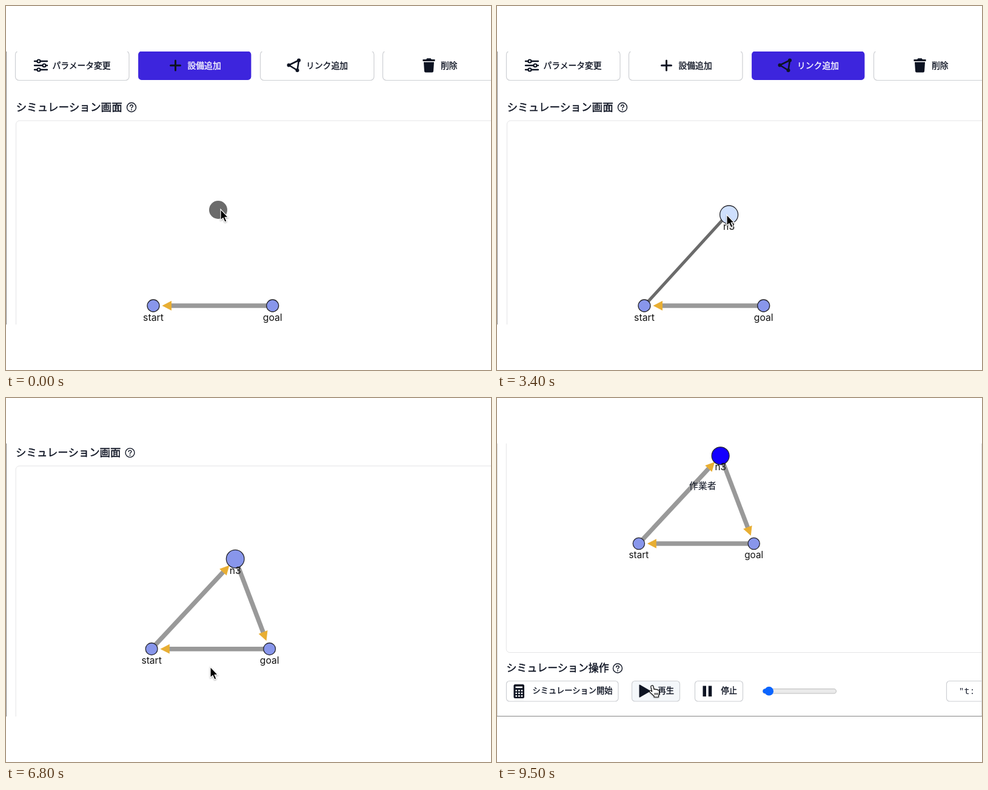
Recreate the animation shown at these times as an HTML page. Size 800 by 600 pixels, loop 9600 ms.

```html
<!DOCTYPE html>
<html lang="ja">
<head>
<meta charset="utf-8">
<style>
html, body { margin: 0; width: 100%; height: 100%; overflow: hidden; background: #fff; }
svg { display: block; width: 800px; height: 600px; }
text { fill: #0d1322; font-family: "Noto Sans CJK JP", "Noto Sans CJK", sans-serif; }
.btn rect { fill: #fff; stroke: #cdcfd3; stroke-width: 1.2; }
.btn text { font-size: 13.8px; stroke: #0d1322; stroke-width: .35; }
.btn.on rect { fill: #3d25dd; stroke: #fff; }
.btn.on text { fill: #fff; stroke: #fff; }
.small text { font-size: 13.25px; }
.btn.hover rect { fill: #f4f7fa; }
.head { font-size: 17.6px; stroke: #0d1322; stroke-width: .4; }
.icon { fill: #0d1322; stroke: none; }
.wire { fill: none; stroke: #0d1322; stroke-linecap: round; stroke-linejoin: round; }
.panel { fill: none; stroke: #e4e4e6; }
.node { fill: #8896eb; stroke: #24242c; stroke-width: 1.3; }
.name { font: 15.8px Inter, sans-serif; fill: #111; text-anchor: middle; }
.link line { stroke: #999; stroke-width: 7.6; }
.link path { fill: #e8ae33; }
.mono { font: 15px "Noto Sans Mono", monospace; white-space: pre; }
</style>
</head>
<body>
<svg viewBox="0 0 800 600">
  <defs>
    <clipPath id="window"><rect y="75" width="800" height="450"/></clipPath>
    <g id="help">
      <circle class="wire" r="7.5" stroke-width="1.4"/>
      <path class="wire" d="M-2.3-1.8C-2.2-4.7 2.5-4.6 2.4-1.8 2.3-.2 0-.2 0 1.5" stroke-width="1.4"/>
      <circle class="icon" cy="4" r=".95"/>
    </g>
  </defs>
  <g clip-path="url(#window)">
    <g id="page">
      <g class="btn">
        <rect x="15.5" y="74" width="187.5" height="48.5" rx="6"/>
        <path class="wire" stroke-width="2.4" d="M47 91H68M47 98H68M47 105H68"/>
        <g fill="#fff" stroke="#0d1322" stroke-width="2.2">
          <circle cx="54" cy="91" r="2.5"/><circle cx="63" cy="98" r="2.5"/><circle cx="54" cy="105" r="2.5"/>
        </g>
        <text x="76.5" y="102.8">パラメータ変更</text>
      </g>
      <g class="btn" id="addBtn">
        <rect x="217.5" y="74" width="187.5" height="48.5" rx="6"/>
        <path class="wire" stroke-width="3" d="M271.5 98H287.5M279.5 90V106"/>
        <text x="299.5" y="102.8">設備追加</text>
      </g>
      <g class="btn" id="linkBtn">
        <rect x="419.5" y="74" width="187.5" height="48.5" rx="6"/>
        <path class="wire" stroke-width="2.6" d="M483 89.5L466.5 97.5 480.5 106Z"/>
        <g class="icon">
          <circle cx="483" cy="89.5" r="3"/><circle cx="466.5" cy="97.5" r="3"/><circle cx="480.5" cy="106" r="3"/>
        </g>
        <text x="495" y="102.8">リンク追加</text>
      </g>
      <g class="btn">
        <rect x="621.5" y="74" width="187.5" height="48.5" rx="6"/>
        <path class="icon" d="M687.5 88H693L694.5 86.3H700.5L702 88H707.5V91H687.5ZM689 92.5H706L705 107.5Q704.8 109.5 703 109.5H692Q690.2 109.5 690 107.5Z"/>
        <text x="717" y="102.8">削除</text>
      </g>
      <text class="head" x="16.5" y="172.8">シミュレーション画面</text>
      <use href="#help" x="207" y="167"/>
      <rect class="panel" x="16.5" y="189" width="830" height="491" rx="6"/>

      <g id="links"></g>
      <line id="drag" stroke="#6b6b6b" stroke-width="5"/>
      <g id="nodes"></g>
      <circle id="ghost" r="15" fill="#6b6b6b"/>

      <!-- lower part, laid out for the scrolled and zoomed view -->
      <g transform="translate(.62 245.26) scale(1.03627)">
        <text id="worker" font-size="15">作業者</text>
        <text class="head" style="font-size:17px" x="15.5" y="451">シミュレーション操作</text>
        <use href="#help" x="199" y="445.5"/>
        <g class="btn small" id="simBtn">
          <rect x="15.5" y="466.5" width="184.5" height="33.5" rx="5"/>
          <rect style="fill:#0d1322;stroke:none" x="27.5" y="472" width="17.5" height="23" rx="2.5"/>
          <path stroke="#fff" stroke-width="2.6" d="M30.5 476.8H42"/>
          <path stroke="#fff" stroke-width="2.4" stroke-dasharray="2.6 2" d="M30.5 482.2H42.3M30.5 486.7H42.3M30.5 491.2H42.3"/>
          <text x="58.5" y="486.7">シミュレーション開始</text>
        </g>
        <g class="btn small" id="playBtn">
          <rect x="222.5" y="466.5" width="79" height="33.5" rx="5"/>
          <path class="icon" d="M234.5 473.5Q234.5 472 236 472.8L252 482Q253 483 252 484L236 493.2Q234.5 494 234.5 492.5Z"/>
          <text x="265.5" y="486.7">再生</text>
        </g>
        <g class="btn small">
          <rect x="326.5" y="466.5" width="79" height="33.5" rx="5"/>
          <path class="icon" d="M339.5 474.5H345V492H339.5ZM348.8 474.5H354.3V492H348.8Z"/>
          <text x="369.5" y="486.7">停止</text>
        </g>
        <rect x="438.5" y="479.5" width="121" height="7.5" rx="3.75" fill="#eaeaea" stroke="#bdbdbd"/>
        <rect id="fill" x="438.5" y="479.5" height="7.5" rx="3.75" fill="#0b65ff"/>
        <circle id="thumb" cy="483.2" r="7.4" fill="#0b65ff"/>
        <g class="btn"><rect x="741.5" y="466.5" width="120" height="33.5" rx="5"/></g>
        <text id="clock" class="mono" style="stroke:none" y="488"></text>
      </g>
    </g>
    <path id="sides" d="M.5 75V525M799.5 75V525" fill="none"/>
    <path id="floor" d="M0 524.5H800" stroke="#858585"/>
    <g id="cursor" style="filter:drop-shadow(0 1px 1px rgba(0,0,0,.35))">
      <path id="arrow" fill="#000" stroke="#fff" stroke-width="1.2" d="M0-1V17L4 13.4 6.9 20 10 18.7 7.2 12.3H12.5Z"/>
      <g id="hand" fill="#fff" stroke="#000" stroke-width="1.1" stroke-linejoin="round">
        <path d="M-1.6.2C-.6-.6.9-.2 1.2 1L2.6 6.4C3.4 5.6 5 5.7 5.5 6.8 6.4 6 8 6.3 8.3 7.4 9.3 6.9 10.6 7.5 10.8 8.7 11.2 11 11.8 14 10 16.5V19H2.6V17.2C0 15.2-2 13-4.6 10.6-6 9-4 7.6-2.6 8.6L-.8 10-2.6 2.4C-2.8 1.4-2.4.6-1.6.2Z"/>
        <path fill="none" d="M4 12V15.5M6.3 12V15.5M8.6 12V15.5"/>
      </g>
    </g>
  </g>
</svg>
<script>
const LOOP = 9600, STEP = 100;
const PLACE = 600, LINK_MODE = 1300, PRESS1 = 2500, DROP1 = 3700, PRESS2 = 4700, DROP2 = 5500;
const SCROLL = 6500, SCROLL_END = 7300, SIM = 7500, PLAY = 8200;

const $ = id => document.getElementById(id);
const show = (el, on) => el.setAttribute('visibility', on ? 'visible' : 'hidden');
const clamp = v => Math.max(0, Math.min(1, v));
const ease = v => v * v * (3 - 2 * v);
const mix = (a, b, k) => a + (b - a) * k;

function make(parent, tag, attrs, text) {
  const el = document.createElementNS('http://www.w3.org/2000/svg', tag);
  for (const k in attrs) el.setAttribute(k, attrs[k]);
  if (text) el.textContent = text;
  return parent.appendChild(el);
}
function set(el, attrs) {
  for (const k in attrs) el.setAttribute(k, attrs[k]);
}

const start = { x: 243, y: 494, r: 10, name: 'start' };
const goal = { x: 439.7, y: 494, r: 10, name: 'goal' };
const n3 = { x: 382.6, y: 344, r: 15, name: 'n3' };
const nodes = [start, goal, n3];

for (const n of nodes) {
  n.el = make($('nodes'), 'g', {});
  n.dot = make(n.el, 'circle', { class: 'node', cx: n.x, cy: n.y, r: n.r });
  make(n.el, 'text', { class: 'name', x: n.x, y: n.y + 24.7 }, n.name);
}

function makeLink(a, b) {
  const len = Math.hypot(b.x - a.x, b.y - a.y) - 14.5;
  const deg = Math.atan2(b.y - a.y, b.x - a.x) * 180 / Math.PI;
  const g = make($('links'), 'g', { class: 'link', transform: `translate(${a.x} ${a.y}) rotate(${deg})` });
  make(g, 'line', { x2: len - 14 });
  make(g, 'path', { d: `M${len} 0l-15.5-8v16z` });
  return g;
}
makeLink(goal, start);
const link1 = makeLink(start, n3), link2 = makeLink(n3, goal);

// time, x, y of the pointer tip
const path = [
  [0, 354, 336], [400, 386, 344], [700, 386, 344], [1200, 508, 98], [1400, 506, 98],
  [1900, 286, 334], [2400, 243, 493], [2600, 243, 493], [3400, 379, 345],
  [3800, 386, 344], [4500, 390, 342], [4700, 388, 344], [5300, 440, 493],
  [5600, 440, 493], [6000, 337, 444], [6900, 337, 444], [7400, 112, 478],
  [7500, 112, 478], [7800, 256.5, 474], [LOOP, 256.5, 474]
];
function pointer(t) {
  const i = path.findIndex(p => p[0] > t), a = path[i - 1], b = path[i];
  const k = ease((t - a[0]) / (b[0] - a[0]));
  return { x: mix(a[1], b[1], k), y: mix(a[2], b[2], k) };
}

function draw(t) {
  const p = pointer(t);
  const z = ease(clamp((t - SCROLL) / (SCROLL_END - SCROLL)));
  const scrolled = z === 1;
  $('page').setAttribute('transform', `translate(${-.6 * z} ${-236.675 * z}) scale(${mix(1, .965, z)})`);
  set($('sides'), { stroke: z > .5 ? '#d9d9d9' : '#8a8a8a' });
  $('sides').setAttribute('d', z > .5 ? 'M.5 75V525M799.5 75V525' : 'M.5 75V525');
  show($('floor'), scrolled);

  $('addBtn').classList.toggle('on', t < LINK_MODE);
  $('linkBtn').classList.toggle('on', t >= LINK_MODE);
  set($('ghost'), { cx: p.x - 4, cy: p.y });
  show($('ghost'), t < PLACE);
  show(n3.el, t >= PLACE);
  show(link1, t >= DROP1);
  show(link2, t >= DROP2);

  const from = t >= PRESS1 && t < DROP1 ? start : t >= PRESS2 && t < DROP2 ? n3 : null;
  show($('drag'), from);
  if (from) set($('drag'), { x1: from.x, y1: from.y, x2: p.x, y2: p.y });

  for (const n of nodes) {
    const over = t < SCROLL && Math.hypot(p.x - n.x, p.y - n.y) < n.r;
    n.dot.style.fill = n === n3 && t >= SIM ? '#1400ff' : over ? '#cfe0fe' : '';
  }

  const run = clamp((t - PLAY) / (9500 - PLAY));
  const k = .617 * run, thumb = 445.7 + 3 * run;
  set($('worker'), { x: 234 + 134 * k, y: 239.5 - 144.6 * k });
  show($('worker'), t >= SIM);
  set($('thumb'), { cx: thumb });
  set($('fill'), { width: thumb - 438.5 });
  const ticking = t > PLAY;
  $('clock').textContent = ticking ? '"t: ' : '––|';
  $('clock').style.fill = ticking ? '#1b2030' : '#7b8290';
  set($('clock'), { x: !ticking ? 779 : t < 9200 ? 766 : 761.5 });

  const overSim = scrolled && p.y > 466 && p.x < 200;
  const overPlay = scrolled && p.y > 466 && p.x > 222;
  $('simBtn').classList.toggle('hover', overSim);
  $('playBtn').classList.toggle('hover', overPlay);
  const hand = overSim || overPlay || (t < 2000 && p.y < 122 && p.x > 419);
  show($('hand'), hand);
  show($('arrow'), !hand);
  $('cursor').setAttribute('transform', `translate(${p.x} ${p.y})`);
}

function tick() {
  draw(Math.floor(performance.now() % LOOP / STEP) * STEP);
  requestAnimationFrame(tick);
}
tick();
</script>
</body>
</html>
```
